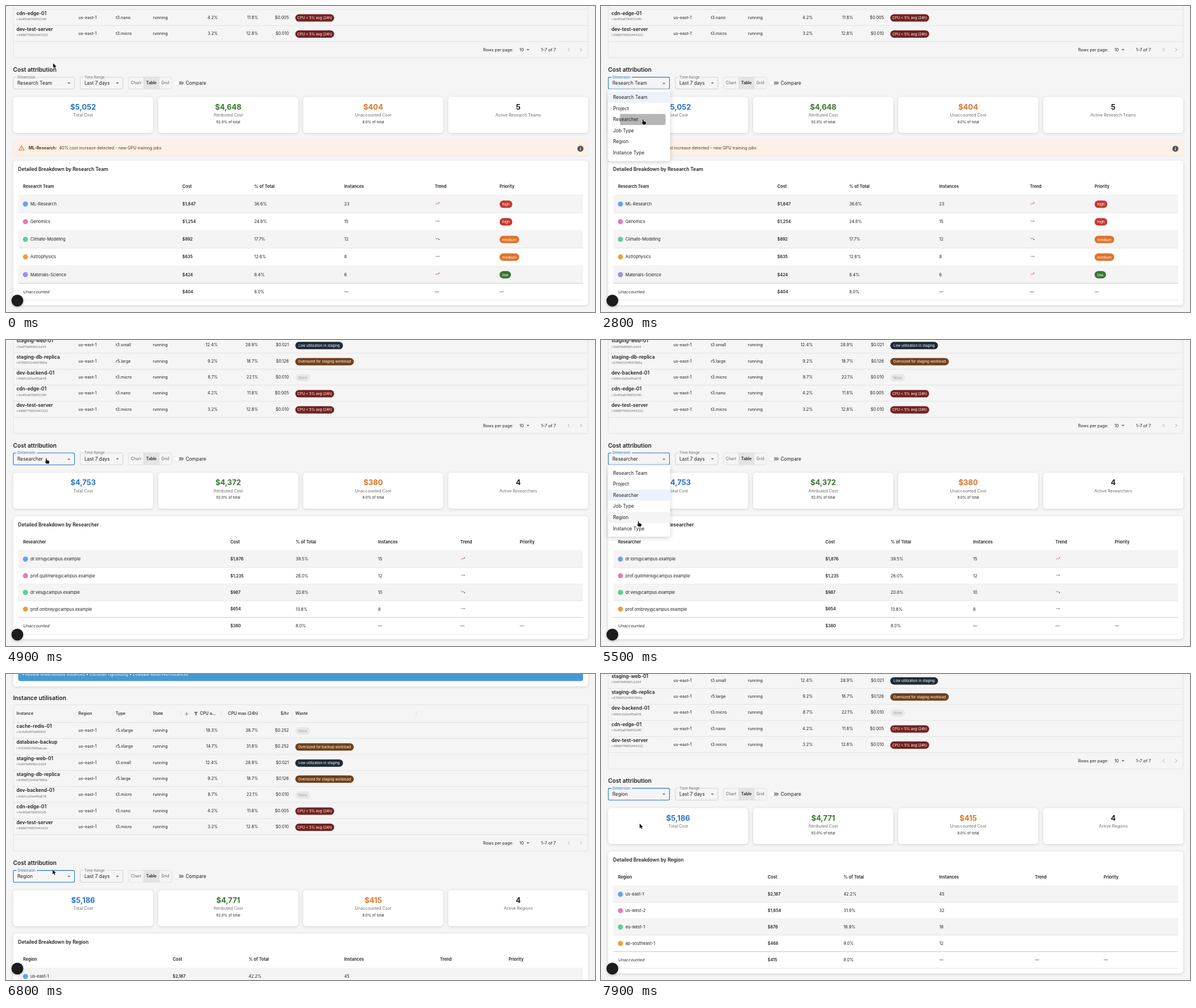
Animation of 1037x540 px, one loop 8000 ms. Source, as an HTML page with a canvas:

```html
<!DOCTYPE html>
<html lang="en">
<head>
<meta charset="utf-8">
<title>Cost attribution</title>
<style>
html, body { margin: 0; width: 100%; height: 100%; overflow: hidden; background: #f5f5f5; }
canvas { display: block; width: 1037px; height: 540px; }
</style>
</head>
<body>
<canvas id="stage"></canvas>
<script>
const W = 1037, H = 540, LOOP = 8000;
const BG = '#f5f5f5', INK = '#1f1f1f', GREY = '#6b6b6b', LINE = '#e0e0e0';
const BLUE = '#2672cb', GREEN = '#37762f', ORANGE = '#e0722a', RED = '#c43830';
const FONT = 'Inter, "Open Sans", sans-serif';
const canvas = document.getElementById('stage');
const c = canvas.getContext('2d');
const dpr = window.devicePixelRatio || 1;
canvas.width = W * dpr;
canvas.height = H * dpr;

// ---- content ----
const DOTS = ['#68a1f2', '#e77ab4', '#5bcd9f', '#eca03b', '#a08df0'];
const ITEMS = ['Research Team', 'Project', 'Researcher', 'Job Type', 'Region', 'Instance Type'];
const CHIP = { high: RED, medium: ORANGE, low: GREEN };
const VIEWS = {
  'Research Team': {
    total: ['$5,052', '$4,648', '$404', '5'], rowH: 31.1, alert: true,
    cols: [30, 310.5, 437, 595.5, 755, 869],
    rows: [
      ['ML-Research', '$1,847', '36.6%', '23', 'up', 'high'],
      ['Genomics', '$1,254', '24.8%', '15', 'flat', 'high'],
      ['Climate-Modeling', '$892', '17.7%', '12', 'down', 'medium'],
      ['Astrophysics', '$635', '12.6%', '8', 'flat', 'medium'],
      ['Materials-Science', '$424', '8.4%', '6', 'up', 'low']
    ]
  },
  'Researcher': {
    total: ['$4,753', '$4,372', '$380', '4'], rowH: 29.4,
    cols: [30, 395, 510, 655, 800, 904.5],
    rows: [
      ['dr.lorn@campus.example', '$1,876', '39.5%', '15', 'up'],
      ['prof.quillmere@campus.example', '$1,235', '26.0%', '12', 'flat'],
      ['dr.ves@campus.example', '$987', '20.8%', '10', 'down'],
      ['prof.ombrey@campus.example', '$654', '13.8%', '8', 'flat']
    ]
  },
  'Region': {
    total: ['$5,186', '$4,771', '$415', '4'], rowH: 28.9,
    cols: [30, 293.5, 427, 595.5, 764, 885],
    rows: [
      ['us-east-1', '$2,187', '42.2%', '45'],
      ['us-west-2', '$1,654', '31.9%', '32'],
      ['eu-west-1', '$876', '16.9%', '18'],
      ['ap-southeast-1', '$468', '9.0%', '12']
    ]
  }
};
const BAD = ['CPU < 5% avg (24h)', '#742321', 68.5];
const SERVERS = [
  ['cache-redis-01', 'i-3c4d5e6f7a890b12', 'r5.xlarge', '18.3%', '38.7%', '$0.252'],
  ['database-backup', 'i-01234567890abcde', 'r5.xlarge', '14.7%', '31.8%', '$0.252', ['Oversized for backup workload', '#73401a', 103]],
  ['staging-web-01', 'i-5e6f7a890b1c2d34', 't3.small', '12.4%', '28.9%', '$0.021', ['Low utilization in staging', '#1f2a37', 84]],
  ['staging-db-replica', 'i-678901234567890a', 'r5.large', '9.2%', '18.7%', '$0.126', ['Oversized for staging workload', '#73401a', 103]],
  ['dev-backend-01', 'i-90b1c2d3e4f5a678', 't3.micro', '8.7%', '22.1%', '$0.010'],
  ['cdn-edge-01', 'i-3e4f5a6789012345', 't3.nano', '4.2%', '11.8%', '$0.005', BAD],
  ['dev-test-server', 'i-9988776655443322', 't3.micro', '3.2%', '12.8%', '$0.010', BAD]
];

// ---- timing ----
const OPEN = [[1095, 2900], [4900, 6000]];
const GROW = 292;
const RIPPLES = [2570, 5670];
const PATH = [
  [300, 83, 101], [900, 81, 141], [1500, 81, 141], [1900, 77, 185], [2100, 73, 200],
  [3350, 73, 200], [3500, 73, 203], [3600, 73, 219], [3800, 71, 227], [4000, 70, 209],
  [4900, 70, 209], [5450, 65, 320], [6650, 65, 320], [6800, 82, 345], [7620, 82, 345], [7900, 68, 264]
];
const clamp = v => Math.max(0, Math.min(1, v));

// cubic-bezier(.4, 0, .2, 1)
function ease(x) {
  x = clamp(x);
  let lo = 0, hi = 1;
  for (let i = 0; i < 20; i++) {
    const u = (lo + hi) / 2;
    const bx = 1.2 * u * (1 - u) ** 2 + 0.6 * u * u * (1 - u) + u ** 3;
    if (bx < x) lo = u; else hi = u;
  }
  return 3 * lo * lo * (1 - lo) + lo ** 3;
}
function pointer(t) {
  let a = PATH[0];
  for (const b of PATH) {
    if (t < b[0]) {
      const k = clamp((t - a[0]) / (b[0] - a[0] || 1)), s = k * k * (3 - 2 * k);
      return [a[1] + (b[1] - a[1]) * s, a[2] + (b[2] - a[2]) * s];
    }
    a = b;
  }
  return [a[1], a[2]];
}
function scrollAt(t) {
  if (t < 2900) return 112.5;
  if (t < 6000) return 186.2;
  return 188.5 + 145 * (ease((t - 6250) / 300) - ease((t - 6940) / 250));
}
const viewAt = t => t < 2900 ? 'Research Team' : t < 6000 ? 'Researcher' : 'Region';

// ---- helpers ----
function text(s, x, y, size, color = INK, weight = 400, align = 'left') {
  c.font = weight + ' ' + size + 'px ' + FONT;
  c.fillStyle = color;
  c.textAlign = align;
  c.fillText(s, x, y + size * 0.36);
}
function slanted(s, x, y, size, color) {
  c.save();
  c.translate(x, y + size * 0.36);
  c.transform(1, 0, -0.2, 1, 0, 0);
  text(s, 0, -size * 0.36, size, color);
  c.restore();
}
function rect(x, y, w, h, color) {
  c.fillStyle = color;
  c.fillRect(x, y, w, h);
}
function round(x, y, w, h, r) {
  c.beginPath();
  c.roundRect(x, y, w, h, r);
}
function fillRound(x, y, w, h, r, color) {
  round(x, y, w, h, r);
  c.fillStyle = color;
  c.fill();
}
function strokeRound(x, y, w, h, r, color, lw) {
  round(x, y, w, h, r);
  c.strokeStyle = color;
  c.lineWidth = lw;
  c.stroke();
}
function shadowed(blur, dy, color, draw) {
  c.shadowBlur = blur * dpr;
  c.shadowOffsetY = dy * dpr;
  c.shadowColor = color;
  draw();
  c.shadowColor = 'transparent';
}
function card(x, y, w, h, color = '#fff') {
  shadowed(5, 1, 'rgba(0,0,0,.15)', () => fillRound(x, y, w, h, 5.5, color));
}
// the shadow stays outside the sheet, so a fading sheet does not turn grey
function sheet(x, y, w, h, r) {
  c.save();
  c.beginPath();
  c.rect(x - 40, y - 40, w + 80, h + 80);
  c.roundRect(x, y, w, h, r);
  c.clip('evenodd');
  shadowed(8, 2.2, 'rgba(0,0,0,.2)', () => fillRound(x, y, w, h, r, '#fff'));
  c.restore();
  fillRound(x, y, w, h, r, '#fff');
}
function line(pts, color, lw) {
  c.beginPath();
  pts.forEach(([x, y], i) => i ? c.lineTo(x, y) : c.moveTo(x, y));
  c.strokeStyle = color;
  c.lineWidth = lw;
  c.stroke();
}
function poly(pts, color) {
  c.beginPath();
  pts.forEach(([x, y]) => c.lineTo(x, y));
  c.closePath();
  c.fillStyle = color;
  c.fill();
}
function disc(x, y, r, color) {
  c.beginPath();
  c.arc(x, y, r, 0, Math.PI * 2);
  c.fillStyle = color;
  c.fill();
}
function caret(x, y, up) {
  const d = up ? -1.3 : 1.3;
  poly([[x - 2.7, y - d], [x + 2.7, y - d], [x, y + d]], GREY);
}
function trend(kind, x, y) {
  c.save();
  c.translate(x + 0.1, y - 4.35);
  c.scale(0.363, 0.363);
  if (kind === 'flat') {
    line([[2, 12], [20, 12]], GREY, 2);
    poly([[18, 8], [22, 12], [18, 16]], GREY);
  } else {
    const down = kind === 'down', color = down ? GREEN : RED;
    if (down) { c.translate(0, 24); c.scale(1, -1); }
    line([[2.7, 17.3], [9.5, 10.5], [13.5, 14.5], [20, 8]], color, 2.2);
    poly([[16, 6], [22, 6], [22, 12]], color);
  }
  c.restore();
}

// ---- page parts ----
function banner(y) {
  card(12.5, y - 420, 1012.5, 108.5);
  fillRound(21.5, y - 410, 994.5, 89, 4, '#4799d5');
  text('• Review underutilized instances • Consider rightsizing • Evaluate Reserved Instances', 28, y - 333.5, 7.2, '#fff');
}
function grid(y) {
  const top = y - 279.2, step = 28.33;
  text('Instance utilisation', 12.5, y - 291.5, 10.25, INK, 600);
  strokeRound(12.8, top, 1011.8, 258.3, 2.5, LINE, 0.9);
  const hy = top + 15.5;
  const head = (s, x, align) => text(s, x, hy, 7.3, INK, 500, align);
  head('Instance', 18.5);
  head('Region', 127.5);
  head('Type', 193);
  head('State', 258.5);
  head('CPU a...', 369.5, 'right');
  head('CPU max (24h)', 444, 'right');
  head('$/hr', 498, 'right');
  head('Waste', 509.5);
  for (const x of [122.5, 188, 254, 307.5, 378.8, 449.6, 504, 722]) rect(x - 0.4, hy - 4, 0.9, 8, LINE);
  line([[318, hy - 3], [318, hy + 2.7]], GREY, 0.9);
  line([[315.2, hy], [318, hy + 2.8], [320.8, hy]], GREY, 0.9);
  poly([[331, hy - 3], [337.8, hy - 3], [335.2, hy + 0.3], [335.2, hy + 3.2], [333.6, hy + 3.2], [333.6, hy + 0.3]], GREY);
  SERVERS.forEach((s, i) => {
    const ry = top + 31 + i * step, m = ry + step / 2;
    rect(13, ry - 0.4, 1011.5, 0.9, LINE);
    text(s[0], 18.4, m - 7.4, 8.45, INK, 600);
    text(s[1], 18.4, m + 3, 5.3, GREY);
    text('us-east-1', 127.5, m, 7.25);
    text(s[2], 193.2, m, 7.3);
    text('running', 258.5, m, 7.3);
    text(s[3], 373, m, 7.3, INK, 400, 'right');
    text(s[4], 444, m, 7.3, INK, 400, 'right');
    text(s[5], 498, m, 7.3, INK, 400, 'right');
    const [label, color, w] = s[6] || ['None', '#e8e8e8', 26];
    fillRound(509.3, m - 5.5, w, 13, 6.5, color);
    text(label, 509.3 + w / 2, m + 0.9, 6.25, s[6] ? '#fff' : '#a0a0a0', 400, 'center');
  });
  rect(13, y - 50.2, 1011.5, 0.9, LINE);
  const fy = y - 35.3;
  text('Rows per page:', 840, fy, 7.25);
  text('10', 904, fy, 7.3);
  caret(919, fy + 0.2);
  text('1–7 of 7', 942, fy, 7.3);
  line([[992.3, fy - 3], [989.3, fy], [992.3, fy + 3]], '#a8a8a8', 1);
  line([[1011, fy - 3], [1014, fy], [1011, fy + 3]], '#a8a8a8', 1);
}
function select(x, y, w, label, value, gap, state) {
  const focus = state !== 'idle' && state !== 'hover';
  const border = focus ? BLUE : state === 'hover' ? '#2a2a2a' : '#c2c2c2';
  strokeRound(x, y + 13.1, w, 20.9, 2.2, border, focus ? 1.1 : 0.7);
  rect(x + 5.5, y + 11.5, gap, 3.5, BG);
  text(label, x + 7.4, y + 13, 6.35, focus ? BLUE : GREY);
  text(value, x + 7.2, y + 23.6, 8.35);
  caret(x + w - 9.8, y + 23.8, state === 'open');
}
function controls(y, view, state) {
  text('Cost attribution', 12.5, y, 10.2, INK, 600);
  select(12.9, y, 107.7, 'Dimension', view, 36, state);
  select(130.7, y, 75.2, 'Time Range', 'Last 7 days', 39, 'idle');
  rect(242.5, y + 13.1, 27, 20.9, '#e4e4e4');
  strokeRound(215.6, y + 13.1, 75.8, 20.9, 2.2, '#d9d9d9', 0.7);
  rect(242.2, y + 13.1, 0.7, 20.9, '#d6d6d6');
  rect(269.2, y + 13.1, 0.7, 20.9, '#d6d6d6');
  text('Chart', 229, y + 23.3, 6.95, '#747474', 500, 'center');
  text('Table', 256, y + 23.3, 6.95, INK, 600, 'center');
  text('Grid', 280.4, y + 23.3, 6.95, '#747474', 500, 'center');
  fillRound(300, y + 20.8, 12.8, 5.5, 2.75, '#9b9b9b');
  shadowed(1.5, 0.4, 'rgba(0,0,0,.16)', () => disc(301, y + 23.6, 4.2, '#fff'));
  text('Compare', 316.2, y + 23.6, 8.4);
}
function totals(y, view, data) {
  const labels = ['Total Cost', 'Attributed Cost', 'Unaccounted Cost', 'Active ' + view + 's'];
  const subs = ['', '92.0% of total', '8.0% of total', ''];
  [BLUE, GREEN, ORANGE, INK].forEach((color, i) => {
    const x = 12.5 + i * 255.35, mid = x + 123.3;
    card(x, y + 48, 246.6, 63.6);
    text(data.total[i], mid, y + 65.5, 13, color, 700, 'center');
    text(labels[i], mid, y + 80, 7.25, GREY, 400, 'center');
    text(subs[i], mid, y + 92, 6.3, INK, 400, 'center');
  });
}
function alertBar(y) {
  shadowed(2, 0.5, 'rgba(0,0,0,.1)', () => fillRound(12.5, y + 124, 1012.5, 28, 5, '#fcf1e7'));
  const m = y + 138;
  poly([[27.3, m - 5], [32.6, m + 4.2], [22, m + 4.2]], ORANGE);
  poly([[27.3, m - 3], [30.8, m + 3.2], [23.8, m + 3.2]], '#fcf1e7');
  rect(26.8, m - 1.2, 1, 2.3, ORANGE);
  rect(26.8, m + 1.7, 1, 0.9, ORANGE);
  text('ML-Research:', 39.8, m, 7.3, '#5f3512', 700);
  text('40% cost increase detected - new GPU training jobs', 93.4, m, 7.28, '#5f3512');
  disc(1011.3, m + 1.3, 5.4, '#555');
  rect(1010.7, m + 0.6, 1.2, 3.4, '#fff');
  rect(1010.7, m - 1.5, 1.2, 1.2, '#fff');
}
function breakdown(y, view, data) {
  const [x0, x1, x2, x3, x4, x5] = data.cols, n = data.rows.length, rh = data.rowH;
  const start = y + 61.3, last = start + n * rh;
  card(12.5, y, 1012.5, last - y + 38.5);
  text('Detailed Breakdown by ' + view, 21.3, y + 14.8, 8.45, INK, 600);
  [view, 'Cost', '% of Total', 'Instances', 'Trend', 'Priority'].forEach((s, i) =>
    text(s, data.cols[i], y + 45.6, 7.35, INK, 600));
  rect(21.5, start - 0.5, 994.5, 0.8, LINE);
  data.rows.forEach((r, i) => {
    const ry = start + i * rh, m = ry + rh / 2;
    if (i % 2 === 0) rect(21.5, ry, 994.5, rh, '#f4f4f4');
    rect(21.5, ry + rh - 0.5, 994.5, 0.8, LINE);
    disc(34.2, m, 4.5, DOTS[i]);
    text(r[0], 43, m, 7.35);
    text(r[1], x1, m, 7.2, INK, 600);
    text(r[2], x2, m, 7.3);
    text(r[3], x3, m, 7.3);
    if (r[4]) trend(r[4], x4, m - 1);
    if (r[5]) {
      const w = { high: 22.5, medium: 34.5, low: 20 }[r[5]];
      fillRound(x5, m - 6.3, w, 13.1, 6.55, CHIP[r[5]]);
      text(r[5], x5 + w / 2, m + 0.4, 6.6, '#fff', 400, 'center');
    }
  });
  rect(21.5, last - 0.7, 994.5, 1.2, '#d3d3d3');
  const m = last + 14.7;
  slanted('Unaccounted', x0, m, 7.3, '#333');
  text(data.total[2], x1, m, 7.2, INK, 600);
  text('8.0%', x2, m, 7.3);
  for (const x of [x3, x4, x5]) text('—', x, m, 7.3);
  rect(21.5, last + 29, 994.5, 0.8, LINE);
}
function menu(t, which, pos) {
  const [from, to] = OPEN[which], closing = t >= to;
  const age = t - (closing ? to : from);
  const alpha = closing ? 1 - ease(age / GROW) : ease(age / GROW);
  if (alpha <= 0.002) return;
  const grow = closing ? 1 - ease((age - GROW / 3) / (GROW * 0.666)) : ease(age / (GROW * 0.666));
  const s = 0.75 + 0.25 * grow;
  const top = [146.8, 220.5][which], chosen = which * 2, target = [2, 4][which], ih = 19.6;
  c.save();
  c.globalAlpha = alpha;
  c.translate(67, top);
  c.scale(s, s * s);
  c.translate(-67, -top);
  sheet(12.6, top, 108.8, ih * 6 + 8.8, 2.2);
  const hover = which === 1 && t > 5150 ? Math.floor((pos[1] - top - 4.4) / ih) : -1;
  ITEMS.forEach((s, i) => {
    const y = top + 4.4 + i * ih;
    if (i === chosen) rect(12.6, y, 108.8, ih, '#ecf2fa');
    else if (i === hover && !closing) rect(12.6, y, 108.8, ih, '#f4f4f4');
    if (i === target) {
      const k = (t - RIPPLES[which]) / 550;
      if (k > 0) {
        c.save();
        c.beginPath();
        c.rect(12.6, y, 108.8, ih);
        c.clip();
        disc([73.5, 65][which], y + ih / 2, 62 * ease(k), 'rgba(0,0,0,' + (0.1 + 0.2 * ease(k * 1.6)) + ')');
        c.restore();
      }
    }
    text(s, 21.3, y + ih / 2, 8.3);
  });
  c.restore();
}
function cursor(t, [x, y]) {
  const hand = (t >= 2400 && t < 3750) || (t >= 4200 && t < 6680);
  c.save();
  c.translate(x, y);
  c.beginPath();
  if (hand) {
    c.translate(-1, -0.5);
    c.moveTo(1, 1);
    c.quadraticCurveTo(1.8, 0, 2.6, 1);
    c.lineTo(2.8, 3.8);
    c.lineTo(6, 4.4);
    c.quadraticCurveTo(7.4, 4.8, 7.2, 6.4);
    c.lineTo(6.5, 9.8);
    c.lineTo(2.2, 9.8);
    c.lineTo(-0.5, 6.4);
    c.quadraticCurveTo(-0.2, 5.2, 1.2, 6.2);
  } else {
    [[0, 0], [0, 8.3], [1.9, 6.6], [3.2, 9.5], [4.6, 8.9], [3.3, 6.1], [5.9, 5.9]].forEach(p => c.lineTo(...p));
  }
  c.closePath();
  c.lineJoin = 'round';
  c.strokeStyle = '#fff';
  c.lineWidth = 1.1;
  c.stroke();
  c.fillStyle = '#111';
  c.fill();
  c.restore();
}

function draw(t) {
  c.setTransform(dpr, 0, 0, dpr, 0, 0);
  rect(0, 0, W, H, BG);
  const y = scrollAt(t), view = viewAt(t), data = VIEWS[view], pos = pointer(t);
  const open = OPEN.some(([a, b]) => t >= a && t < b);
  const state = open ? 'open' : t >= 1095 ? 'focus' : pos[1] > y + 13 ? 'hover' : 'idle';
  banner(y);
  grid(y);
  controls(y, view, state);
  totals(y, view, data);
  if (data.alert) alertBar(y);
  breakdown(y + (data.alert ? 160.2 : 124.5), view, data);
  OPEN.forEach(([a, b], i) => { if (t >= a && t < b + GROW) menu(t, i, pos); });
  shadowed(4, 1, 'rgba(0,0,0,.25)', () => disc(20, 519.8, 10.4, '#1c1c1c'));
  cursor(t, pos);
}

const began = performance.now();
function tick() {
  draw((performance.now() - began) % LOOP);
  requestAnimationFrame(tick);
}
tick();
</script>
</body>
</html>
```
